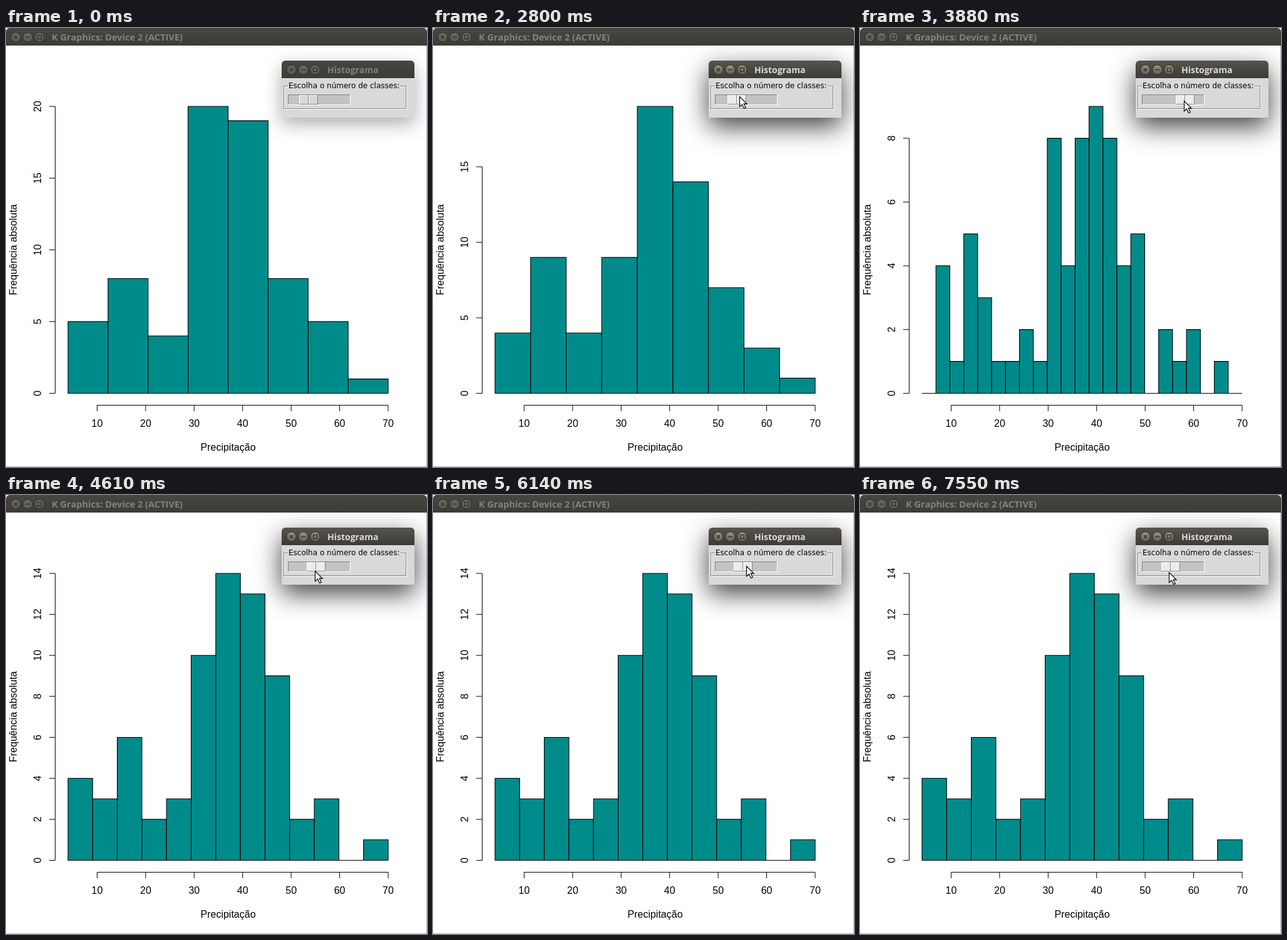
An HTML page with a canvas for the animation above (7.58 s loop, 672 px wide and 700 px high).

```html
<!DOCTYPE html>
<html lang="pt">
<head>
<meta charset="utf-8">
<title>Histograma</title>
<style>
  html, body { margin: 0; width: 672px; height: 700px; overflow: hidden; background: #fff; }
  canvas { display: block; }
</style>
</head>
<body>
<canvas id="stage" width="672" height="700"></canvas>
<script>
const ctx = document.getElementById('stage').getContext('2d');
const LOOP = 7580, BASE_Y = 582.5, TOP_Y = 125, MIN = 4, MAX = 70;
const CHART_FONT = '16px "Liberation Sans", Arial, sans-serif';

const rain = [
  6.9, 7.6, 8.3, 9, 11.8, 13.2, 13.7, 14.4, 14.8, 15.3, 16, 16.6, 17.8, 20.8,
  22.5, 24.8, 25.4, 29, 30, 30.2, 30.7, 31.1, 31.4, 31.7, 32.1, 32.4, 33.6, 34.1,
  34.8, 35.2, 35.7, 35.9, 36.1, 36.3, 36.5, 36.7, 36.9, 37.8, 38.6, 38.9, 39.2, 39.4,
  39.7, 40.1, 40.5, 40.8, 41.1, 41.6, 41.8, 42.1, 42.3, 42.6, 42.8, 43.1, 43.4, 44.9,
  45.7, 46.2, 46.7, 48.3, 48.6, 48.9, 49.2, 49.5, 54, 54.4, 56.2, 59, 59.5, 66];

// Each move: first step, last step, number of steps, then cursor x, cursor y, knob x
const moves = [
  [1000, 1480, 9, 482, 109, 468],
  [1740, 1930, 4, 476, 109, 462],
  [1990, 2080, 2, 474, 109, 460],
  [2390, 2800, 6, 489, 109, 470],
  [2890, 3070, 3, 495, 110, 477],
  [3160, 3880, 10, 517, 116, 504],
  [3940, 4610, 9, 493, 121, 480],
  [4670, 4670, 1, 490, 121, 478],
  [4760, 5350, 9, 476, 118, 463],
  [5530, 6140, 9, 500, 113, 480],
  [6240, 6240, 1, 502, 113, 482],
  [6330, 6780, 7, 514, 117, 498],
  [6930, 7550, 9, 493, 123, 481]];

function poseAt(t) {
  let pose = [590, 74, 468];
  for (const [start, end, steps, ...target] of moves) {
    if (t < start) break;
    const done = t >= end ? steps : 1 + Math.floor((t - start) / (end - start) * (steps - 1));
    pose = pose.map((v, i) => Math.round(v + (target[i] - v) * done / steps));
  }
  return pose;
}

function fill(color, x, y, w, h) {
  ctx.fillStyle = color;
  ctx.fillRect(x, y, w, h);
}

function line(x1, y1, x2, y2) {
  ctx.beginPath();
  ctx.moveTo(x1, y1);
  ctx.lineTo(x2, y2);
  ctx.stroke();
}

function text(str, x, y, font, color = '#000', align = 'left', angle = 0) {
  ctx.save();
  ctx.translate(x, y);
  ctx.rotate(angle);
  ctx.font = font;
  ctx.fillStyle = color;
  ctx.textAlign = align;
  ctx.fillText(str, 0, 0);
  ctx.restore();
}

function bevel(x, y, w, h, face, light, dark) {
  fill(dark, x, y, w, h);
  fill(light, x, y, w - 1, h - 1);
  fill(face, x + 1, y + 1, w - 2, h - 2);
}

function titleBar(x, y, w, title, size, active) {
  const shade = ctx.createLinearGradient(0, y, 0, y + 28);
  shade.addColorStop(0, active ? '#56544d' : '#474640');
  shade.addColorStop(1, '#3c3b37');
  ctx.fillStyle = shade;
  ctx.beginPath();
  ctx.roundRect(x, y, w, 28, [6, 6, 0, 0]);
  ctx.fill();

  const cy = y + 14.5;
  [15.5, 34.5, 53.5].forEach((dx, i) => {
    const cx = x + dx;
    const face = ctx.createLinearGradient(0, cy - 8, 0, cy + 8);
    face.addColorStop(0, active ? '#c9a468' : '#6a6862');
    face.addColorStop(active ? 0.35 : 1, active ? '#827d71' : '#5c5a54');
    if (active) face.addColorStop(1, '#66625a');
    ctx.fillStyle = face;
    ctx.strokeStyle = '#31302c';
    ctx.lineWidth = 1;
    ctx.beginPath();
    ctx.arc(cx, cy, 7.5, 0, 7);
    ctx.fill();
    ctx.stroke();
    ctx.lineWidth = 1.3;
    if (i === 0) {
      line(cx - 2.5, cy - 2.5, cx + 2.5, cy + 2.5);
      line(cx - 2.5, cy + 2.5, cx + 2.5, cy - 2.5);
    } else if (i === 1) line(cx - 4, cy, cx + 4, cy);
    else ctx.strokeRect(cx - 3, cy - 3, 6, 6);
  });
  text(title, x + 73, y + 20, `bold ${size}px "Open Sans", sans-serif`, active ? '#dfdbd2' : '#85827b');
}

function histogram(classes) {
  const counts = Array(classes).fill(0);
  for (const v of rain) counts[Math.floor((v - MIN) / (MAX - MIN) * classes)]++;
  const peak = Math.max(...counts);
  const xOf = v => 99 + (v - MIN) * 511 / 66;
  const yOf = n => BASE_Y - n * (BASE_Y - TOP_Y) / peak;

  ctx.strokeStyle = '#000';
  ctx.lineWidth = 1.1;
  ctx.fillStyle = '#008b8b';
  const width = 511 / classes;
  counts.forEach((n, i) => {
    ctx.beginPath();
    ctx.rect(99 + i * width, yOf(n), width, BASE_Y - yOf(n));
    ctx.fill();
    ctx.stroke();
  });

  ctx.lineWidth = 1;
  line(xOf(10), 601.5, xOf(70), 601.5);
  for (let v = 10; v <= 70; v += 10) {
    line(xOf(v), 601.5, xOf(v), 611);
    text(v, xOf(v), 636, CHART_FONT, '#000', 'center');
  }
  const step = peak > 35 ? 10 : peak > 14 ? 5 : peak > 7 ? 2 : 1;
  line(78.5, BASE_Y, 78.5, yOf(peak - peak % step));
  for (let n = 0; n <= peak; n += step) {
    line(69, yOf(n), 78.5, yOf(n));
    text(n, 56, yOf(n), CHART_FONT, '#000', 'center', -Math.PI / 2);
  }
  text('Precipitação', 354.5, 674, CHART_FONT, '#000', 'center');
  text('Frequência absoluta', 17, 353.5, CHART_FONT, '#000', 'center', -Math.PI / 2);
}

function panel(knob, active, hover) {
  ctx.save();
  ctx.shadowColor = `rgba(0,0,0,${active ? 0.75 : 0.32})`;
  ctx.shadowBlur = active ? 40 : 28;
  ctx.shadowOffsetY = active ? 14 : 10;
  ctx.fillStyle = '#d9d9d9';
  ctx.beginPath();
  ctx.roundRect(440, 52, 212, 91, [6, 6, 0, 0]);
  ctx.fill();
  ctx.restore();
  titleBar(440, 52, 212, 'Histograma', 14, active);

  ctx.lineWidth = 1;
  ctx.strokeStyle = '#fff';
  ctx.strokeRect(444.5, 93.5, 195, 36);
  ctx.strokeStyle = '#828282';
  ctx.strokeRect(443.5, 92.5, 195, 36);
  fill('#d9d9d9', 450, 84, 179, 16);
  text('Escolha o número de classes:', 451, 96, '12px "DejaVu Sans", sans-serif');

  bevel(450, 106, 100, 17, '#c3c3c3', '#828282', '#fff');
  const face = hover ? '#ececec' : '#d9d9d9';
  bevel(knob, 107, 15, 15, face, '#fff', '#828282');
  bevel(knob + 15, 107, 15, 15, face, '#fff', '#828282');
}

function cursor(x, y) {
  ctx.save();
  ctx.translate(x + 0.5, y + 0.5);
  ctx.fillStyle = '#fff';
  ctx.strokeStyle = '#111';
  ctx.lineWidth = 1.3;
  const arrow = new Path2D('M0 0V16L4 12.5L7 19L9.7 17.8L6.8 11.5H11.5Z');
  ctx.fill(arrow);
  ctx.stroke(arrow);
  ctx.restore();
}

function draw(t) {
  const [x, y, knob] = poseAt(t);
  fill('#fff', 0, 0, 672, 700);
  fill('#b4b4b4', 671, 28, 1, 672);
  fill('#b4b4b4', 0, 699, 672, 1);
  titleBar(0, 0, 672, 'K Graphics: Device 2 (ACTIVE)', 14.6, false);
  histogram(Math.round((knob - 450) / 2.33));
  panel(knob, t >= 1740, t >= 1000 && x < knob + 30);
  if (t >= 1000) cursor(x, y);
}

const began = performance.now();
function tick() {
  draw((performance.now() - began) % LOOP);
  requestAnimationFrame(tick);
}
tick();
</script>
</body>
</html>
```
